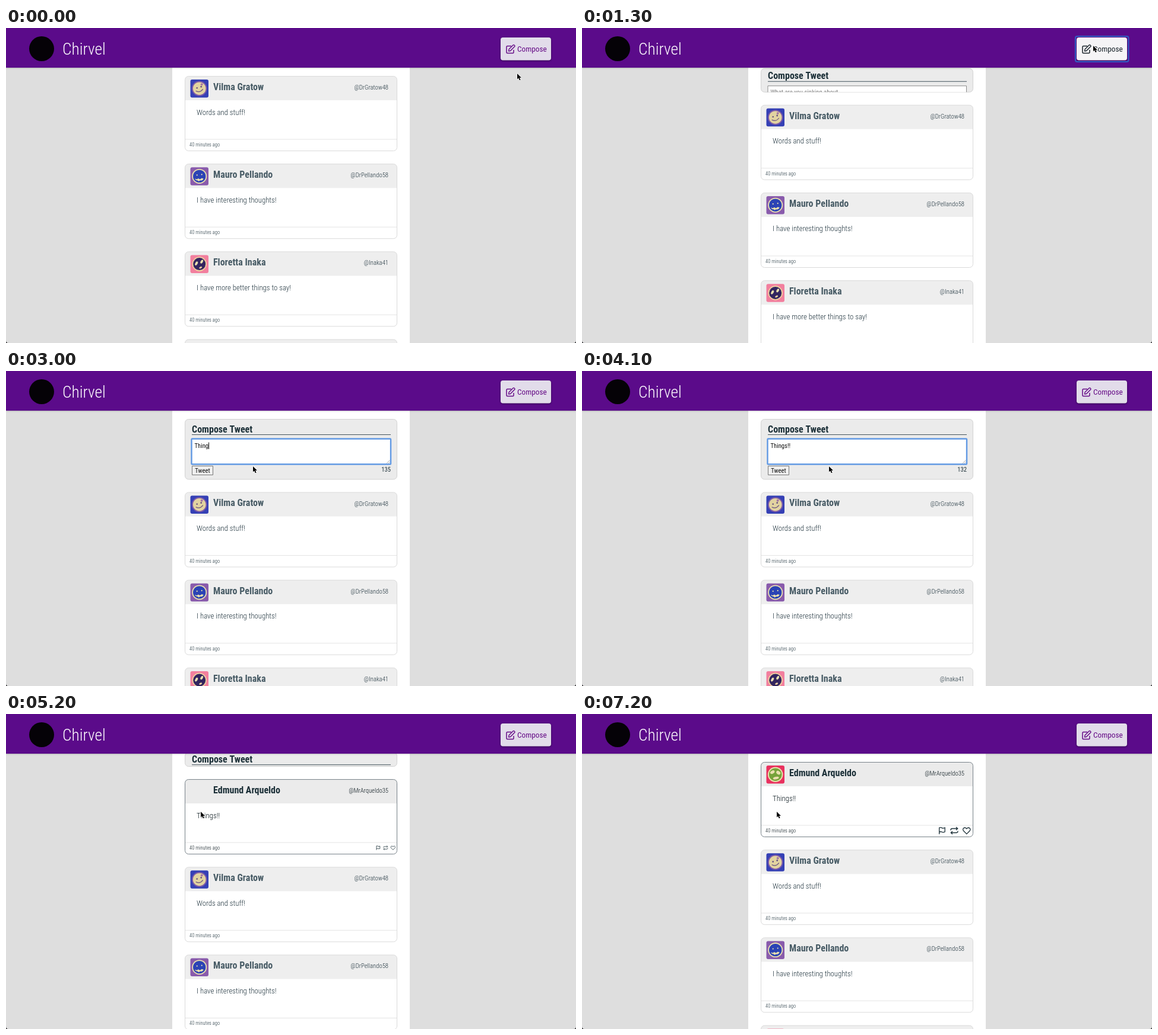
Recreate the animation shown at these times as an HTML page with a canvas. Size 960 px wide and 532 px high, loop 7300 ms.

```html
<!DOCTYPE html>
<html lang="en">
<head>
<meta charset="utf-8">
<title>Chirvel</title>
<style>
  html, body { margin: 0; width: 100%; height: 100%; overflow: hidden; background: #dedede; }
  canvas { display: block; width: 960px; height: 532px; }
</style>
</head>
<body>
<canvas id="stage" width="960" height="532"></canvas>
<script>
const ctx = document.getElementById('stage').getContext('2d');
const LOOP = 7300;
const FAMILY = '"Roboto Condensed", Roboto, sans-serif';
const DARK = '#1c3038', DIM = '#475b65', PURPLE = '#5b0b8a', CREAM = '#e9dfae';
// Thin text needs a deeper ink to keep its tone
const THIN_DARK = '#07151b', THIN_DIM = '#1f333d';
const PITCH = 148.2, TOP = 81.5, OPEN = 123.5;
const SLIDE = 490, OPEN_AT = 1089, CLOSE_AT = 4869;
const TYPE_AT = 2400, TYPE_STEP = 150, SUBMIT_AT = 4800;
const HOVER_AT = 5050, AVATAR_AT = 5500;
const MESSAGE = 'Things!!';

const posts = [
  { name: 'Vilma Gratow', handle: '@DrGratow48', body: 'Words and stuff!', face: 'smile' },
  { name: 'Mauro Pellando', handle: '@DrPellando58', body: 'I have interesting thoughts!', face: 'grin' },
  { name: 'Floretta Inaka', handle: '@Inaka41', body: 'I have more better things to say!', face: 'night' },
  { name: '', handle: '', body: '', face: null }
];
const newPost = { name: 'Edmund Arqueldo', handle: '@MrArqueldo35', body: MESSAGE, face: 'leaf' };

// Pointer stops: time, x, y
const path = [
  [0, 861, 77], [150, 861, 77], [700, 861, 30], [1500, 861, 30],
  [1900, 713, 109], [2350, 416, 161], [4100, 416, 161], [4650, 328, 165]
];

const clamp = v => Math.max(0, Math.min(1, v));
const swing = v => 0.5 - Math.cos(Math.PI * clamp(v)) / 2;

function setFont(size, weight) {
  ctx.font = `${weight} condensed ${size}px ${FAMILY}`;
}

setFont(100, 400);
const tracking = ctx.measureText('Compose').width > 405 ? -0.055 : 0;

function text(str, x, y, size, weight, color, align = 'left') {
  setFont(size, weight);
  ctx.letterSpacing = `${tracking * size}px`;
  ctx.textAlign = align;
  ctx.fillStyle = color;
  ctx.fillText(str, x, y);
}

function rect(x, y, w, h, color) {
  ctx.fillStyle = color;
  ctx.fillRect(x, y, w, h);
}

function box(x, y, w, h, r, fill, stroke, width = 1) {
  ctx.beginPath();
  ctx.roundRect(x, y, w, h, r);
  if (fill) { ctx.fillStyle = fill; ctx.fill(); }
  if (stroke) { ctx.strokeStyle = stroke; ctx.lineWidth = width; ctx.stroke(); }
}

function disc(x, y, r, color, ry = r, turn = 0) {
  ctx.beginPath();
  ctx.ellipse(x, y, r, ry, turn, 0, Math.PI * 2);
  ctx.fillStyle = color;
  ctx.fill();
}

function strokePath(d, color, width) {
  ctx.strokeStyle = color;
  ctx.lineWidth = width;
  ctx.stroke(new Path2D(d));
}

function at(x, y, scale, draw) {
  ctx.save();
  ctx.translate(x, y);
  ctx.scale(scale, scale);
  draw();
  ctx.restore();
}

function withShadow(color, blur, draw) {
  ctx.save();
  ctx.shadowColor = color;
  ctx.shadowBlur = blur;
  ctx.shadowOffsetY = 1;
  draw();
  ctx.restore();
}

const faces = {
  smile() {
    box(-15.2, -15.2, 30.5, 30.5, 3, '#3540b5');
    disc(0, 0, 12.8, '#7b59a8');
    disc(0, 0, 10.8, '#e2d3a0');
    disc(-4, -1, 1.3, '#665080');
    disc(3, -3, 1.4, '#665080');
    disc(4, -7, 2, '#a678a4');
    strokePath('M-6 4Q1 8 6 1', '#665080', 1.2);
  },
  grin() {
    box(-15.2, -15.2, 30.5, 30.5, 3, '#895bac');
    disc(0, 0, 12.5, CREAM);
    disc(0, 0, 10.7, '#2b43b5');
    disc(-4, -2, 1.1, CREAM);
    disc(4, -3, 1.1, CREAM);
    ctx.fillStyle = CREAM;
    ctx.fill(new Path2D('M-8 4L-4 5L-2 3.5L1 5L4 3L7 4Q5 8 1 7L-1 8.5L-3 7Q-6 7 -8 4Z'));
  },
  night() {
    box(-15.2, -15.2, 30.5, 30.5, 3, '#f27f9e');
    disc(0, 0, 12.3, '#eecf9f');
    disc(0, 0, 10.5, '#33255f');
    disc(-5, -1, 2, CREAM, 3.6, 0.5);
    disc(4, -4, 2, CREAM, 3.4, 0.5);
    disc(2, 6, 2.6, '#eecf9f', 1.6, -0.4);
  },
  leaf() {
    box(-15.2, -15.2, 30.5, 30.5, 3, '#e9315f');
    disc(0, 0, 12.8, CREAM);
    disc(0, 0, 10.8, '#76a33a');
    disc(-5, -4, 4, CREAM, 2.6, -0.5);
    disc(5, -3, 3.8, CREAM, 2.8, 0.6);
    disc(1, 6, 5, CREAM, 2.2, -0.2);
  }
};

function actions(y, scale) {
  if (scale <= 0) return;
  const icons = [
    'M-4.5 6V-5.5M-4.5 -5Q-2 -6 0 -4.6Q2 -3.4 5 -5V2Q2 3.5 0 2.3Q-2 1.2 -4.5 2.3',
    'M-6 -.5V-1Q-6 -3.5 -3.5 -3.5H5.5M3 -6L5.7 -3.5L3 -1M6 .5V1Q6 3.5 3.5 3.5H-5.5M-3 6L-5.7 3.5L-3 1',
    'M0 5.6L-5.3 .2C-8 -3 -3.7 -7.3 0 -3.3C3.7 -7.3 8 -3 5.3 .2Z'
  ];
  icons.forEach((d, i) => {
    const x = 658 - (10.2 + 20.8 * (2 - i)) * scale;
    at(x, y, scale, () => strokePath(d, DARK, 1.3));
  });
}

function card(post, y, hover, grow, showFace) {
  const ink = hover ? DARK : DIM;
  const thin = hover ? THIN_DARK : THIN_DIM;
  box(301.5, y, 357, 126, 6, '#fff');
  box(301.5, y, 357, 40.5, [6, 6, 0, 0], hover ? '#ebebeb' : '#eee');
  rect(302, y + 106, 356, 1, '#e4e4e4');
  box(301.5, y, 357, 126, 6, null, hover ? '#778188' : '#dadada');
  if (post.face && showFace) at(325.7, y + 20.7, 1, faces[post.face]);
  text(post.name, 349, y + 23.3, 16, 700, ink);
  text(post.handle, 644, y + 22.5, 10.67, 300, thin, 'right');
  text(post.body, 321, y + 65, 12.8, 300, thin);
  text('40 minutes ago', 309, y + 118.5, 8.53, 300, thin);
  if (hover) actions(y + 115.5, grow);
}

function composer(p, t) {
  if (p <= 0) return;
  const top = TOP - 21.5 * (1 - p);
  const bottom = TOP + OPEN * p - 22;
  if (bottom <= top) return;
  const sent = t >= SUBMIT_AT;
  const typing = t >= OPEN_AT + SLIDE && !sent;
  const count = sent ? 0 : Math.max(0, Math.min(MESSAGE.length, Math.floor((t - TYPE_AT) / TYPE_STEP) + 1));
  const typed = MESSAGE.slice(0, count);

  box(301.5, top, 357, bottom - top, 6, '#ebebeb', '#d2d2d2');
  ctx.save();
  ctx.beginPath();
  ctx.roundRect(301.5, top, 357, bottom - top, 6);
  ctx.clip();
  ctx.translate(0, -28.5 * (1 - p));
  text('Compose Tweet', 313, 103.7, 16, 700, DARK);
  rect(313, 107, 335, 1, '#44545c');

  if (typing) box(312.5, 114.5, 335.5, 43, 1, '#fff', '#6199e3', 2.4);
  else box(313, 115, 334.5, 42, 0, '#fff', '#8a8a8a');
  strokePath('M641 156L646.5 150.5M644 156L646.5 153.5', '#999', 0.8);
  if (typed) text(typed, 317.5, 129.6, 10.67, 400, '#111');
  else text('What are you sinking about...', 317.5, 129.6, 10.67, 400, '#7c7c7c');

  const lastKey = count ? TYPE_AT + (count - 1) * TYPE_STEP : OPEN_AT + SLIDE;
  if (typing && (t - lastKey) % 1000 < 500) {
    setFont(10.67, 400);
    rect(317.5 + (typed ? ctx.measureText(typed).width : 0), 120.5, 1, 11.5, '#111');
  }

  if (sent) box(312, 159.5, 38, 17.5, 3, '#fff', '#6199e3', 2.6);
  box(313.5, 160.5, 35, 15, 0, sent ? '#f8f8f8' : '#efefef', sent ? null : '#777');
  text('Tweet', 331, 171.7, 10.67, 400, '#111', 'center');
  text(String(140 - count), 648, 170, 10.67, 400, DARK, 'right');
  ctx.restore();
}

function header(pointer, t) {
  withShadow('rgba(0,0,0,.2)', 2, () => rect(0, 0, 960, 67, PURPLE));
  disc(60, 35, 21, '#050207');
  text('Chirvel', 95, 45.4, 27.4, 300, '#fff');

  const hover = pointer.x > 833 && pointer.x < 918 && pointer.y > 16 && pointer.y < 55;
  const ink = hover ? '#18232a' : '#650a86';
  withShadow('rgba(20,0,40,.6)', 3, () => {
    box(833, 16, 85, 38.5, 4, hover ? '#f5f4f6' : '#e2dcea');
  });
  if (t >= 1000 && t < 1600) box(831, 14, 89.5, 43, 3, null, '#315fc6', 2);
  strokePath('M851 30.5H844.5Q843 30.5 843 32V41Q843 42.5 844.5 42.5H853.5Q855 42.5 855 41V37', ink, 1.5);
  strokePath('M847 36L854.2 28.8Q855 28 855.8 28.8L856.7 29.7Q857.5 30.5 856.7 31.3L849.5 38.5L846.6 39Z', ink, 1.4);
  text('Compose', 861, 40.2, 13.33, 400, ink);
}

function pointerAt(t) {
  let i = path.length - 1;
  while (i > 0 && path[i][0] > t) i--;
  const a = path[i], b = path[i + 1] || a;
  const k = b === a ? 0 : swing((t - a[0]) / (b[0] - a[0]));
  return { x: a[1] + (b[1] - a[1]) * k, y: a[2] + (b[2] - a[2]) * k };
}

function drawPointer({ x, y }) {
  const arrow = new Path2D('M0 0V9.6L2.2 7.6L3.8 11.2L5.6 10.4L4 6.9H7Z');
  at(x, y, 1, () => {
    ctx.lineJoin = 'round';
    ctx.strokeStyle = '#fff';
    ctx.lineWidth = 1.4;
    ctx.stroke(arrow);
    ctx.fillStyle = '#000';
    ctx.fill(arrow);
  });
}

function corners() {
  ctx.fillStyle = '#16161a';
  ctx.fill(new Path2D('M0 528Q0 532 4 532H0ZM960 528Q960 532 956 532H960Z'));
}

function draw(t) {
  const p = swing((t - OPEN_AT) / SLIDE) - swing((t - CLOSE_AT) / SLIDE);
  const pointer = pointerAt(t);
  const list = t >= SUBMIT_AT ? [newPost, ...posts] : posts;

  rect(0, 0, 960, 532, '#dedede');
  rect(280, 67, 400, 465, '#fff');
  composer(p, t);
  list.forEach((post, i) => {
    const y = TOP + OPEN * p + PITCH * i;
    if (y > 532) return;
    const isNew = post === newPost;
    card(post, y, isNew && t >= HOVER_AT, clamp((t - HOVER_AT) / 250), !isNew || t >= AVATAR_AT);
  });
  header(pointer, t);
  drawPointer(pointer);
  corners();
}

const start = performance.now();
function frame() {
  draw((performance.now() - start) % LOOP);
  requestAnimationFrame(frame);
}
frame();
</script>
</body>
</html>
```
